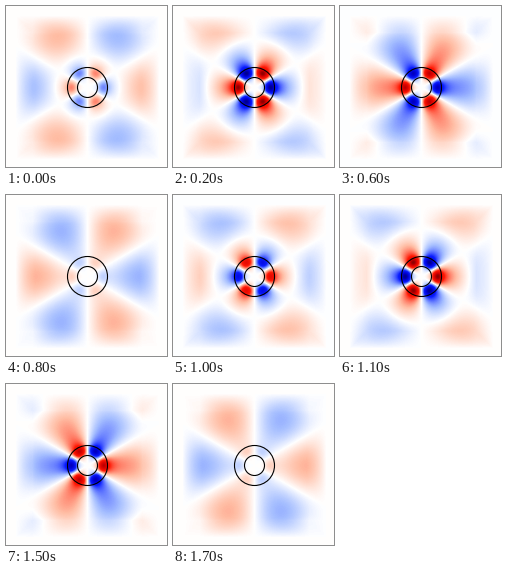
Animation, 161 px wide and 161 px high, one loop 1800 ms. Source, as a matplotlib script:

```python
import numpy as np
import matplotlib.pyplot as plt
from matplotlib.animation import FuncAnimation
from matplotlib.colors import LinearSegmentedColormap
from matplotlib.patches import Circle

SIZE, FRAMES, INTERVAL = 161, 18, 100
CENTER, CORE, SHELL = 81, 10, 20
ORDER, WAVENUMBER = 3, 0.078
PHASE = np.radians(16)
PEAK = 2.6


def integrate(f, t):
    return ((f[:, 1:] + f[:, :-1]) / 2 * np.diff(t)).sum(axis=1)


def hankel(x):
    """Outgoing cylinder wave of odd order from its integral form."""
    x = x[:, None]
    a = np.linspace(0, np.pi, 400)
    t = np.linspace(0, 6, 600)
    j = integrate(np.cos(ORDER * a - x * np.sin(a)), a)
    y = integrate(np.sin(x * np.sin(a) - ORDER * a), a)
    y -= integrate(2 * np.sinh(ORDER * t) * np.exp(-x * np.sinh(t)), t)
    return (j + 1j * y) / np.pi


def make_cmap():
    levels = np.array([-2.6, -1.8, -1.1, -0.4, 0, 0.4, 1.1, 1.8, 2.6])
    colors = ["#00003c", "#0000d2", "#0a1eff", "#a5beff", "#ffffff",
              "#ffbea5", "#ff1905", "#d20000", "#3c0000"]
    stops = (levels + PEAK) / (2 * PEAK)
    return LinearSegmentedColormap.from_list("wave", list(zip(stops, colors)), N=512)


def make_field():
    axis = np.arange(SIZE) - CENTER
    x, y = np.meshgrid(axis, axis)
    r = np.hypot(x, y)

    # The wave stops advancing and fades inside the absorbing border.
    reach = np.hypot(np.clip(x, -55, 55), np.clip(y, -55, 55))
    depth = np.clip((np.maximum(abs(x), abs(y)) - 52) / 20, 0, 1)
    fade = 1 - depth ** 1.5

    radii = np.linspace(SHELL, 90, 300)
    wave = hankel(WAVENUMBER * radii)
    outer = np.interp(reach, radii, wave.real) + 1j * np.interp(reach, radii, wave.imag)

    bump = np.polyfit([10, 13, 16, 20], [0.35, 1.1, 1.4, 1], 3)
    inner = np.where(r < CORE, 0.35 * (r / CORE) ** 3, np.polyval(bump, r))
    radial = np.where(r < SHELL, inner * wave[0], outer * fade)
    return radial * np.cos(ORDER * np.arctan2(y, x))


field = make_field()
fig = plt.figure(figsize=(SIZE / 100, SIZE / 100), dpi=100, facecolor="white")
ax = fig.add_axes([0, 0, 1, 1])
ax.axis("off")
image = ax.imshow(field.real, cmap=make_cmap(), vmin=-PEAK, vmax=PEAK,
                  interpolation="nearest", aspect="auto")
for radius in (CORE, SHELL):
    ax.add_patch(Circle((CENTER, CENTER), radius, fill=False, ec="black", lw=0.8))
ax.set_xlim(-0.5, SIZE - 0.5)
ax.set_ylim(SIZE - 0.5, -0.5)


def update(i):
    angle = 2 * np.pi * i / FRAMES + PHASE
    image.set_data((field * np.exp(-1j * angle)).real)
    return [image]


anim = FuncAnimation(fig, update, frames=FRAMES, interval=INTERVAL, repeat=True)
plt.show()
```
